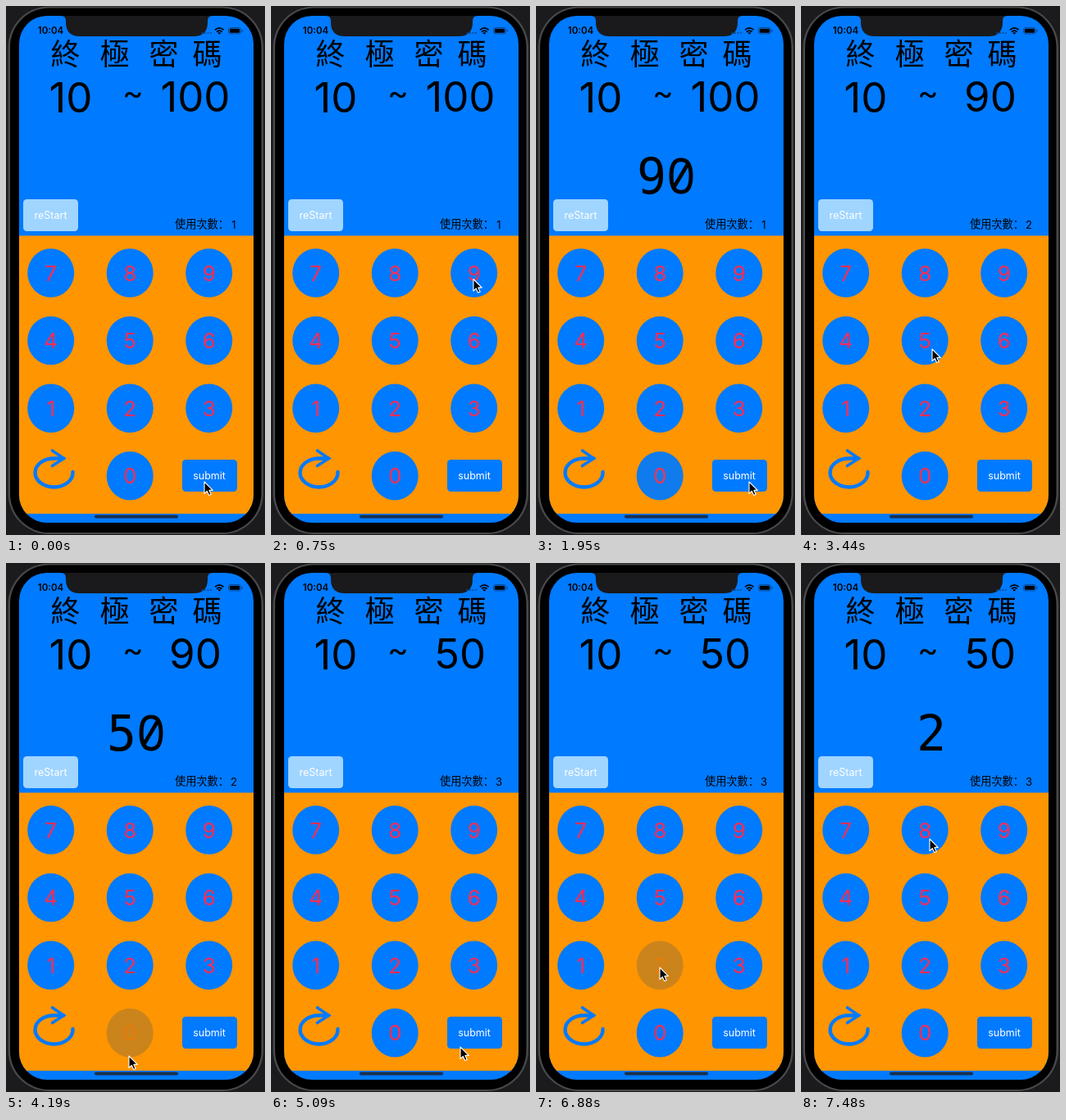
Recreate the animation shown at these times as an HTML page. Size 316 by 646 pixels, loop 8 s.

```html
<!DOCTYPE html>
<html lang="zh-Hant">
<head>
<meta charset="utf-8">
<title>Number guessing</title>
<style>
  html, body { margin: 0; width: 100%; height: 100%; overflow: hidden; background: #1b1b1d; }
  svg { display: block; width: 316px; height: 646px; }
  text { font-family: Inter, "Liberation Sans", sans-serif; text-anchor: middle; white-space: pre; }
  .cjk { font-family: "Noto Sans CJK TC", "Noto Sans CJK", sans-serif; }
  .colon { font-family: "Noto Sans CJK SC", "Noto Sans CJK", sans-serif; }
  .title { font-size: 36px; }
  .range { font-size: 51px; }
  .entry { font-family: "DejaVu Sans Mono", monospace; font-size: 60px; }
  .zero { font-family: "Noto Sans Mono", monospace; }
  .key { font-size: 26px; fill: #ff2d55; }
  .label { font-size: 12.5px; fill: #fff; }
</style>
</head>
<body>
<svg viewBox="0 0 316 646">
  <defs>
    <clipPath id="screen"><rect x="16" y="12" width="286" height="619" rx="34"/></clipPath>
  </defs>

  <rect width="316" height="646" fill="#1b1b1d"/>
  <rect x="2.5" y="0.5" width="311.5" height="644.5" rx="50" fill="#48494c"/>
  <rect x="5" y="2.5" width="306.5" height="640.5" rx="47.5" fill="#000"/>

  <g clip-path="url(#screen)">
    <rect x="16" y="12" width="286" height="619" fill="#007aff"/>
    <rect x="16" y="280.5" width="286" height="339.5" fill="#ff9500"/>
    <path d="M67 12 Q73 12 73 18 V20 Q73 37 90 37 H229 Q246 37 246 20 V18 Q246 12 252 12Z" fill="#1a1a1c"/>
  </g>
  <rect x="108" y="621.5" width="102" height="4" rx="2" fill="#18304f"/>

  <text x="54.5" y="34" font-size="11.5" font-weight="600">10:04</text>
  <path d="M239.500 33 H251" stroke="#0a4c98" stroke-width="2.2" stroke-linecap="round" stroke-dasharray="0 3.5"/>
  <g fill="none" stroke="#000" stroke-width="1.7">
    <path d="M255 29.2 Q260.3 24.6 265.6 29.2M257 31.5 Q260.3 28.7 263.6 31.5"/>
    <path d="M258.3 32.7 L260.3 34.7 L262.3 32.7 Q260.3 31.3 258.3 32.7Z" fill="#000" stroke="none"/>
    <rect x="271.5" y="26.5" width="15" height="7.5" rx="2.2" stroke="#064a98" stroke-width="1"/>
    <rect x="272.8" y="27.8" width="12.4" height="4.9" rx="1.2" fill="#000" stroke="none"/>
    <path d="M288.3 29 V31.5" stroke="#064a98" stroke-width="1.2"/>
  </g>

  <g class="title">
    <text class="cjk" x="72.5" y="72">終</text>
    <text class="cjk" x="132.5" y="72">極</text>
    <text class="cjk" x="192.5" y="72">密</text>
    <text class="cjk" x="245.5" y="72">碼</text>
  </g>
  <text class="range" x="79" y="130">10</text>
  <text x="155" y="120" font-size="39">~</text>
  <text class="range" id="upper" x="231" y="129"></text>
  <text class="entry" id="entry" x="159" y="229"></text>

  <rect x="21" y="236" width="67" height="39" rx="4.5" fill="#a0d5ff"/>
  <text class="label" x="54.5" y="260">reStart</text>
  <text class="cjk" x="206" y="271" font-size="13.2" style="text-anchor:start">使用次數<tspan class="colon" lang="zh-Hans">：</tspan></text>
  <text id="count" x="278" y="271.5" font-size="13"></text>

  <g id="keypad"></g>
  <g fill="none" stroke="#007aff" stroke-linecap="round">
    <path d="M70 552.5 H60 A23 17.5 0 1 0 81.5 569" stroke-width="4.4"/>
    <path d="M56.5 543 L70.5 552.5 L56.5 561.5" stroke-width="3.6"/>
  </g>
  <rect x="215" y="554" width="67" height="39" rx="4.5" fill="#007aff"/>
  <text class="label" x="248" y="578">submit</text>

  <path id="cursor" d="M0 0 V14.5 L3.3 11.4 L5.7 16.6 L8.2 15.5 L5.9 10.4 H10.3Z"
        stroke="#fff" stroke-width="1.1" stroke-linejoin="round"/>
</svg>

<script>
const LOOP = 8000;
const STEP = 149.4;
const TAP = 0.7;    // how long a tap stays down
const FADE = 2.8;   // how long a key takes to recover

const $ = id => document.getElementById(id);
const smooth = u => {
  u = Math.min(1, Math.max(0, u));
  return u * u * (3 - 2 * u);
};

// Where the pointer stops and what it taps there
const stops = [
  { at: 0, hold: 1, x: 242, y: 581 },
  { at: 5.3, x: 247, y: 330, tap: '9' },
  { at: 8, x: 180, y: 617, hold: 0 },
  { at: 10, x: 152, y: 586, tap: '0' },
  { at: 13, hold: 5, x: 260, y: 581, tap: 'submit' },
  { at: 23, x: 160, y: 419, tap: '5' },
  { at: 27.3, x: 150, y: 602, tap: '0' },
  { at: 33, x: 250, y: 587, tap: 'submit' },
  { at: 34, hold: 3, x: 231, y: 591 },
  { at: 40, hold: 1, x: 221, y: 591 },
  { at: 45.8, hold: 2.5, x: 151, y: 494, tap: '2' },
  { at: 50, x: 157, y: 337 }
];

function add(parent, tag, attrs) {
  const node = document.createElementNS('http://www.w3.org/2000/svg', tag);
  for (const name in attrs) node.setAttribute(name, attrs[name]);
  return parent.appendChild(node);
}

function makeKey(digit) {
  const col = digit ? (digit - 1) % 3 : 1;
  const row = digit ? 2 - Math.floor((digit - 1) / 3) : 3;
  const cx = 54.7 + 96.5 * col, cy = 326 + 82.6 * row;
  const key = add($('keypad'), 'g', {});
  add(key, 'ellipse', { cx, cy, rx: 28.5, ry: 29.7, fill: '#007aff' });
  add(key, 'text', { class: 'key', x: cx, y: cy + 9.5 }).textContent = digit;
  return key;
}
const keys = Array.from({ length: 10 }, (_, digit) => makeKey(digit));

function cursorAt(step) {
  const i = stops.findLastIndex(stop => stop.at <= step);
  const from = stops[i], to = stops[i + 1] ?? from;
  const leave = from.at + (from.hold ?? TAP);
  const u = to === from ? 0 : smooth((step - leave) / (to.at - leave));
  return [from.x + (to.x - from.x) * u, from.y + (to.y - from.y) * u];
}

// Replays the taps released so far
function gameAt(step) {
  const game = { entry: '', upper: '100', count: 1 };
  for (const { at, tap } of stops) {
    if (!tap || at + TAP > step) continue;
    if (tap === 'submit') {
      game.upper = game.entry || game.upper;
      game.entry = '';
      game.count++;
    } else {
      game.entry += tap;
    }
  }
  return game;
}

// 0 while a key is held down, 1 once it has recovered
function recovery(digit, step) {
  const last = stops.findLast(stop => stop.tap === String(digit) && stop.at < step);
  return last ? smooth((step - last.at - TAP) / FADE) : 1;
}

function draw(time) {
  const step = Math.floor((time % LOOP) / STEP);
  const { entry, upper, count } = gameAt(step);
  $('entry').innerHTML = entry.replace('0', '<tspan class="zero">0</tspan>');
  $('upper').textContent = upper;
  $('count').textContent = count;

  keys.forEach((key, digit) => {
    const u = recovery(digit, step);
    key.style.opacity = 0.2 + 0.8 * u;
    key.style.filter = u < 1 ? `brightness(${1 - 0.45 * (1 - u) ** 2})` : 'none';
  });
  $('cursor').setAttribute('transform', `translate(${cursorAt(step)})`);
}

const start = performance.now();
function tick() {
  draw(performance.now() - start);
  requestAnimationFrame(tick);
}
tick();
</script>
</body>
</html>
```
